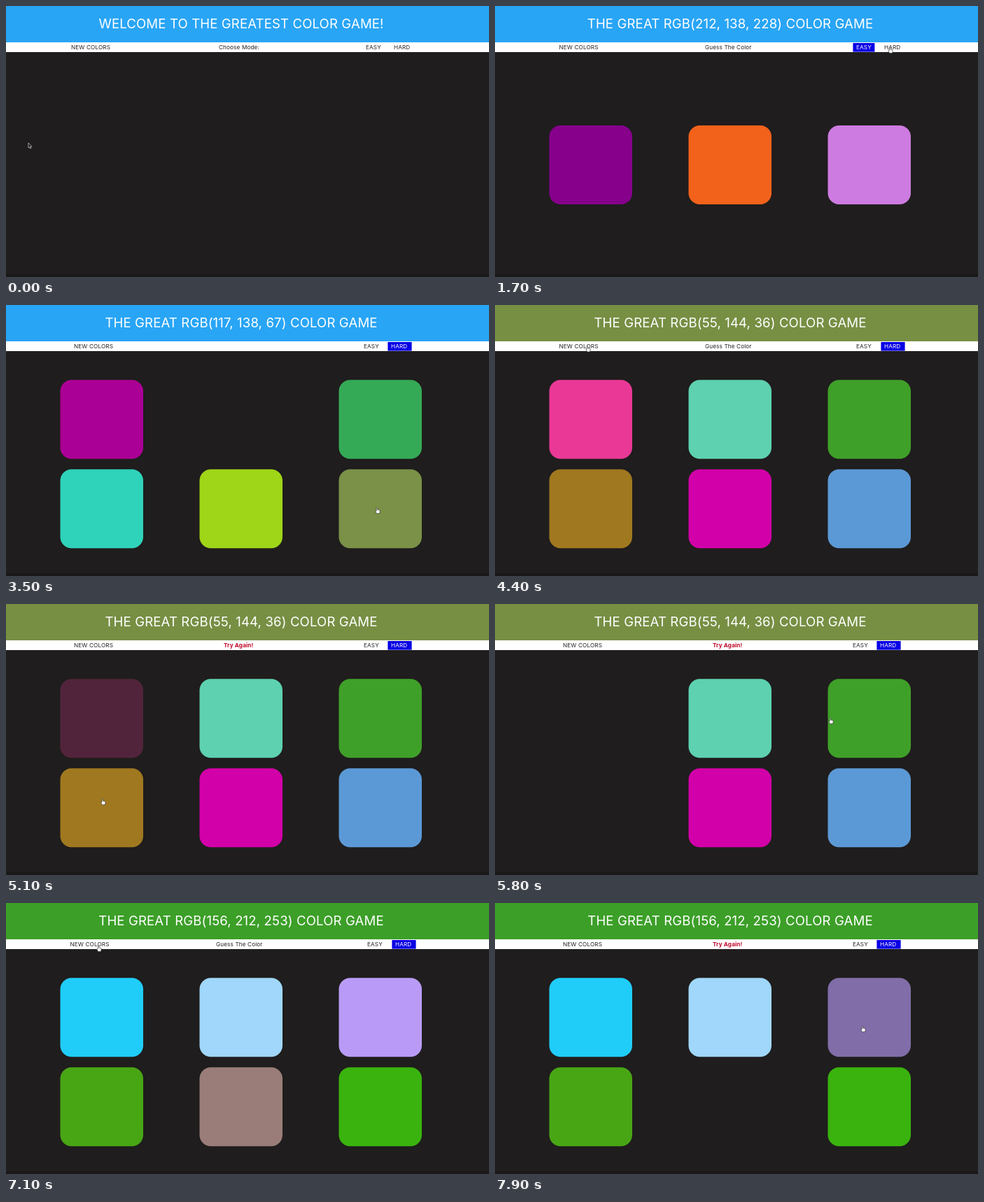
An HTML page that plays this animation: 690 px wide and 388 px high, repeating every 8000 ms.

```html
<!DOCTYPE html>
<html lang="en">
<head>
<meta charset="utf-8">
<title>Color game</title>
<style>
html, body { margin: 0; width: 100%; height: 100%; overflow: hidden; background: #1f1d1d; }
svg { display: block; width: 100vw; height: 100vh; font-family: Inter, sans-serif; }
.title { font-size: 18.6px; letter-spacing: .12px; fill: #fff; text-anchor: middle; }
.nav { font-size: 8.2px; letter-spacing: .12px; fill: #222; }
</style>
</head>
<body>
<svg id="stage" viewBox="0 0 690 388"></svg>
<script>
const LOOP = 8000, STEP = 100, FADE = 400;
const BG = [31, 29, 29];
const stage = document.getElementById("stage");

function add(tag, attrs, parent = stage) {
  const el = document.createElementNS("http://www.w3.org/2000/svg", tag);
  set(el, attrs);
  parent.append(el);
  return el;
}
function set(el, attrs) {
  for (const k in attrs) el.setAttribute(k, attrs[k]);
}
const hex = s => [0, 2, 4].map(i => parseInt(s.slice(i, i + 2), 16));
const clamp = v => Math.max(0, Math.min(1, v));
const mix = (a, b, p) => a.map((v, i) => v + (b[i] - v) * p);
const css = c => `rgb(${c.map(Math.round).join(",")})`;

// Each round: start time, colours, wrong picks as [tile, time], winning pick
const rounds = [
  { at: 0, colors: [], misses: [] },
  { at: 1000, rgb: "212, 138, 228", colors: "86008c f3621b cd7be0", misses: [] },
  { at: 2000, rgb: "117, 138, 67", colors: "ab0095 566fd6 35aa56 2fd3ba 9fd617 7a9147",
    misses: [[1, 2900]], win: [5, 3500] },
  { at: 4000, rgb: "55, 144, 36", colors: "ea3896 5dd1b0 3fa029 a0781f d200a8 5b99d6",
    misses: [[0, 4800], [3, 5200]], win: [2, 6000] },
  { at: 6600, rgb: "156, 212, 253", colors: "20cdf9 a0d7fa b99bf7 48a615 9a7d79 3ab30e",
    misses: [[4, 7300], [2, 7755]] }
];
for (const r of rounds) if (r.rgb) r.colors = r.colors.split(" ").map(hex);

// Pointer path: time, x, y
const path = [
  [0, 32, 196], [300, 310, 108], [400, 310, 108], [900, 526, 59], [1300, 526, 59],
  [1700, 564, 59], [2100, 564, 59], [2800, 370, 171], [2900, 370, 171],
  [3400, 530, 290], [3600, 530, 290], [3950, 132, 58.5], [4400, 132, 58.5],
  [4700, 136, 165], [4850, 136, 165], [5150, 138, 288], [5300, 138, 288],
  [5800, 479, 163], [5950, 515, 165], [6150, 515, 165], [6550, 132, 61],
  [7100, 132, 61], [7300, 332, 285], [7400, 332, 285], [7800, 525, 176], [8000, 525, 176]
];

const header = add("rect", { width: 690, height: 52 });
add("rect", { y: 52, width: 690, height: 14, fill: "#fff" });
add("rect", { y: 384, width: 690, height: 4, fill: "#1a1818" });
const title = add("text", { class: "title", x: 336, y: 32.4 });
const chosen = add("rect", { y: 53, height: 12.6, fill: "#0800e4" });
const [reset, message, easy, hard] = ["NEW COLORS", "", "EASY", "HARD"].map(label => {
  const el = add("text", { class: "nav", y: 62.2 });
  el.textContent = label;
  return el;
});
const tiles = Array.from({ length: 6 }, (_, i) =>
  add("rect", { x: 77.5 + 199 * (i % 3), width: 118.5, height: 113, rx: 16 }));
const arrow = add("path", {
  d: "M0 0V7L1.6 5.6 2.6 8 3.8 7.5 2.8 5.2H4.8Z",
  fill: "#111", stroke: "#eee", "stroke-width": .65
});
const hand = add("path", {
  d: "M-.8.6Q0-.5.7.6V3L3.7 3.8Q4.4 4 4.2 5L3.6 8.5H-.4L-2.2 5.5Q-2.4 4.3-.8 5Z",
  fill: "#fff", stroke: "#222", "stroke-width": .6
});

function pointerAt(t) {
  const i = Math.max(1, path.findIndex(p => p[0] > t));
  const [a, b] = [path[i - 1], path[i]];
  const p = clamp((t - a[0]) / (b[0] - a[0]));
  return mix(a, b, p * p * (3 - 2 * p)).slice(1);
}

function tileColor(r, i, t) {
  const base = r.colors[i];
  if (!base) return BG;
  let c = base;
  const miss = r.misses.find(m => m[0] === i);
  if (miss) c = mix(c, BG, clamp((t - miss[1]) / FADE));
  if (r.win) c = mix(c, r.colors[r.win[0]], clamp((t - r.win[1]) / FADE));
  return c;
}

function drawNav(r, n, t) {
  const missed = r.misses.some(m => t >= m[1]);
  const won = r.win && t >= r.win[1];
  const xs = n === 0 ? [93, 304, 514, 554] : missed ? [97, 311, 511, 550] : [91.5, 300, 516, 556];
  [reset, message, easy, hard].forEach((el, i) => set(el, { x: xs[i] }));
  message.textContent = n === 0 ? "Choose Mode:" : won ? "" : missed ? "Try Again!" : "Guess The Color";
  set(message, missed ? { "font-weight": 700, style: "fill:#c00c2c" } : { "font-weight": 400, style: "" });
  easy.style.fill = n === 1 ? "#fff" : "";
  hard.style.fill = n > 1 ? "#fff" : "";
  set(chosen, n === 1 ? { x: xs[2] - 4.6, width: 31 } : { x: xs[3] - 4.6, width: n ? 34.2 : 0 });
}

function drawPointer(t, count) {
  const [x, y] = pointerAt(t);
  const overNav = y > 53 && y < 66 && (x < 155 && x > 90 || x > 510 && x < 586);
  const overTile = tiles.slice(0, count).some(el => {
    const dx = x - el.getAttribute("x"), dy = y - el.getAttribute("y");
    return dx > 0 && dx < 118 && dy > 0 && dy < 113;
  });
  const link = overNav || overTile;
  set(hand, { transform: `translate(${x} ${y})`, visibility: link ? "visible" : "hidden" });
  set(arrow, { transform: `translate(${x} ${y})`, visibility: link ? "hidden" : "visible" });
}

function draw(t) {
  const n = rounds.filter(r => t >= r.at).length - 1;
  const r = rounds[n], before = rounds[Math.max(0, n - 1)];
  const count = r.colors.length;

  let top = hex("29a5f5");
  for (const q of rounds) if (q.win && t >= q.win[1])
    top = mix(top, q.win[0] === 5 ? hex("778f43") : hex("3c9f28"), clamp((t - q.win[1]) / FADE));
  set(header, { fill: css(top) });
  title.textContent = n ? `THE GREAT RGB(${r.rgb}) COLOR GAME` : "WELCOME TO THE GREATEST COLOR GAME!";

  drawNav(r, n, t);
  tiles.forEach((el, i) => {
    const c = mix(tileColor(before, i, t), tileColor(r, i, t), clamp((t - r.at) / FADE));
    set(el, {
      y: count === 3 ? 171 : i < 3 ? 107.3 : 235.3,
      fill: css(c),
      visibility: i < count ? "visible" : "hidden"
    });
  });
  drawPointer(t, count);
}

const start = performance.now();
function tick() {
  const t = (performance.now() - start) % LOOP;
  draw(Math.floor(t / STEP) * STEP);
  requestAnimationFrame(tick);
}
tick();
</script>
</body>
</html>
```
